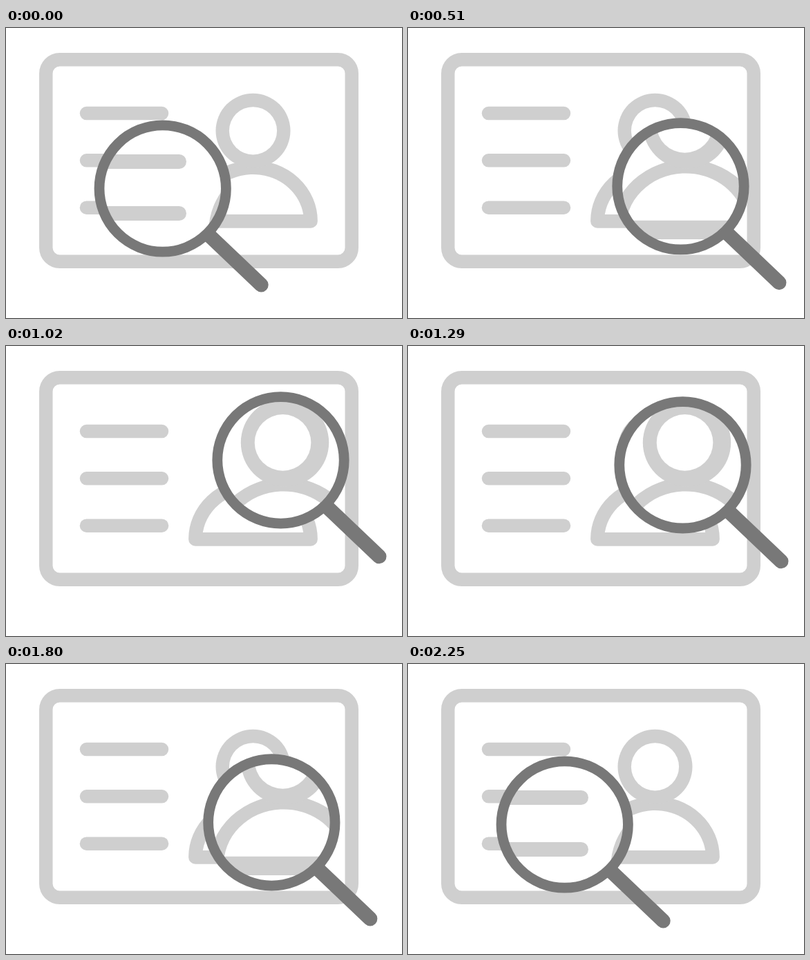
Write an HTML page with a canvas that moves like this. It is 573 by 420 pixels and loops after 2280 ms.

```html
<!DOCTYPE html>
<html lang="en">
<head>
<meta charset="utf-8">
<title>Card search</title>
<style>
html, body { margin: 0; width: 100%; height: 100%; overflow: hidden; background: #fff; }
canvas { display: block; }
</style>
</head>
<body>
<canvas id="stage" width="573" height="420"></canvas>
<script>
const ctx = document.getElementById('stage').getContext('2d');
const LIGHT = '#cfcfcf', DARK = '#787878', WHITE = '#fff';
const LOOP = 2280, STEP = 30, TRAVEL = 2254;
const STOPS = [[226.7, 232.5], [397.5, 229.2], [397.5, 160.3], [397.5, 229.2], [226.7, 232.5]];

// cubic-bezier(.42, 0, .58, 1)
function easeInOut(x) {
  let lo = 0, hi = 1;
  for (let i = 0; i < 24; i++) {
    const s = (lo + hi) / 2, r = 1 - s;
    if (1.26 * s * r * r + 1.74 * s * s * r + s * s * s < x) lo = s; else hi = s;
  }
  return lo * lo * (3 - 2 * lo);
}

function lensAt(time) {
  const pos = Math.min(time / TRAVEL, 1) * 4;
  const leg = Math.min(Math.floor(pos), 3);
  const k = easeInOut(pos - leg);
  return STOPS[leg].map((v, i) => v + (STOPS[leg + 1][i] - v) * k);
}

function stroke(color, width) {
  ctx.strokeStyle = color;
  ctx.lineWidth = width;
  ctx.stroke();
}

function line(x1, y1, x2, y2, color, width) {
  ctx.beginPath();
  ctx.moveTo(x1, y1);
  ctx.lineTo(x2, y2);
  stroke(color, width);
}

function disc(x, y, r, color) {
  ctx.beginPath();
  ctx.arc(x, y, r, 0, Math.PI * 2);
  ctx.fillStyle = color;
  ctx.fill();
}

// Offsets move the white openings relative to the grey silhouette.
function person(headDx = 0, bodyDx = 0, bodyDy = 0) {
  ctx.beginPath();
  ctx.ellipse(357.5, 279.7, 83.4, 78, 0, Math.PI, 0);
  ctx.closePath();
  ctx.fillStyle = LIGHT;
  ctx.fill();
  stroke(LIGHT, 20);
  disc(357.5, 148.8, 54, LIGHT);

  ctx.beginPath();
  ctx.ellipse(357.5 + bodyDx, 280 + bodyDy, 73.5, 68, 0, Math.PI + 0.148, -0.148);
  ctx.closePath();
  ctx.fillStyle = WHITE;
  ctx.fill();
  disc(357.5 + headDx, 148.8, 34.6, WHITE);
}

function card() {
  ctx.beginPath();
  ctx.roundRect(57.8, 45.8, 442.5, 292.5, 20);
  stroke(LIGHT, 19.5);
  for (const y of [123.6, 191.8, 260.2]) line(116.5, y, 225.5, y, LIGHT, 19.5);
  person();
}

function magnifiedCard() {
  for (const y of [118.5, 193.5, 268.5]) line(130, y, 250.5, y, LIGHT, 21);
  ctx.translate(403.5, 306);
  ctx.scale(1.18, 1.18);
  ctx.translate(-357.5, -289.6);
  person(-2.5, -1.5, -3.4);
}

function draw(time) {
  const [x, y] = lensAt(time);
  ctx.fillStyle = WHITE;
  ctx.fillRect(0, 0, 573, 420);
  ctx.lineCap = ctx.lineJoin = 'round';
  card();

  ctx.save();
  disc(x, y, 90, WHITE);
  ctx.clip();
  magnifiedCard();
  ctx.restore();

  line(x + 69, y + 69.5, x + 142.5, y + 139.5, DARK, 21);
  ctx.beginPath();
  ctx.arc(x, y, 91.7, 0, Math.PI * 2);
  stroke(DARK, 14.8);
}

const start = performance.now();
function tick() {
  const time = (performance.now() - start) % LOOP;
  draw(Math.floor(time / STEP) * STEP);
  requestAnimationFrame(tick);
}
tick();
</script>
</body>
</html>
```
